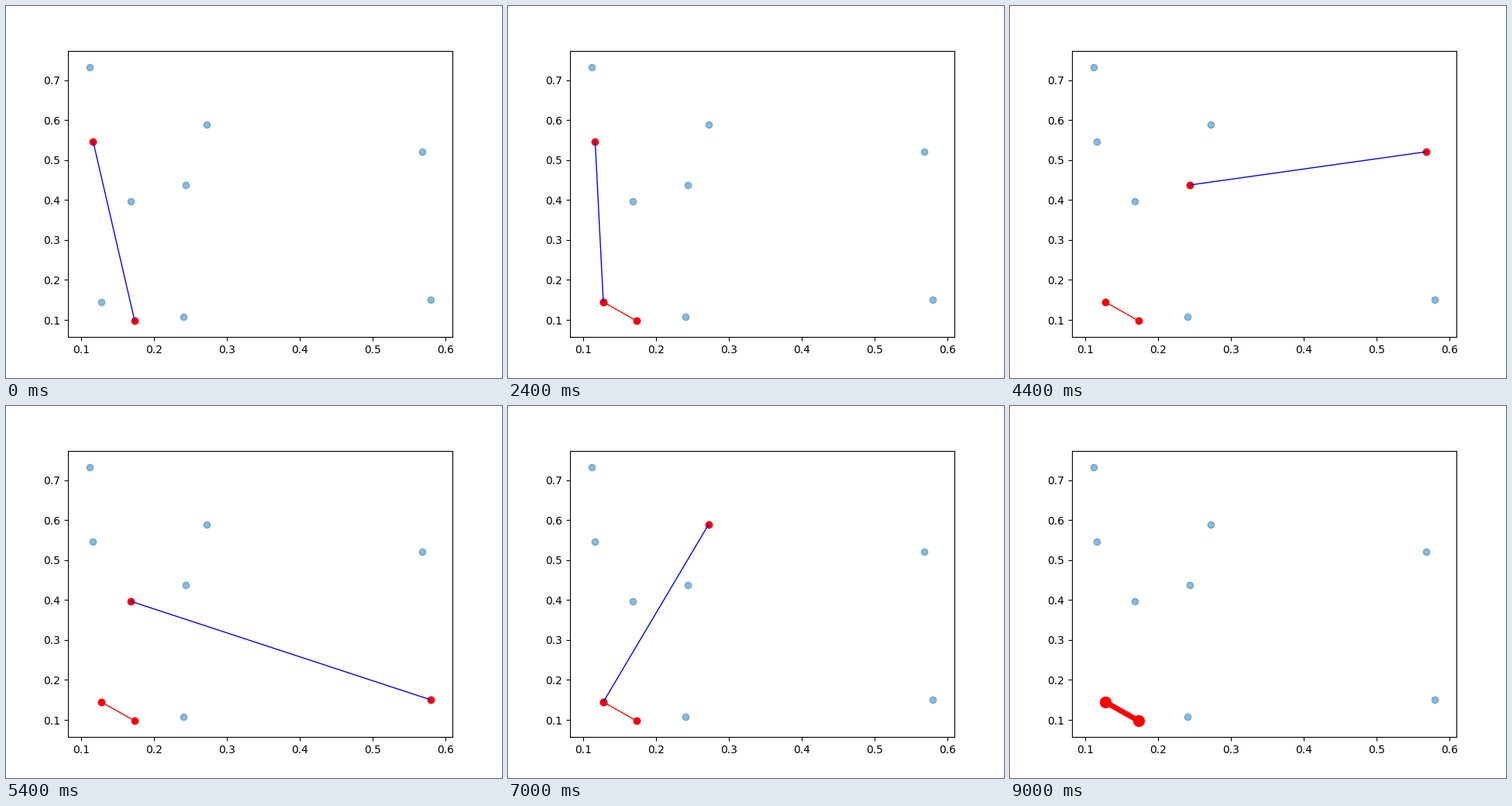
Write a matplotlib script that moves like this. It is 640 by 480 pixels and loops after 9.2 s.

```python
from itertools import combinations
from math import dist

import matplotlib.pyplot as plt
from matplotlib.animation import FuncAnimation

WIDTH, HEIGHT, DPI = 640, 480, 100
INTERVAL = 200
MARGIN = 0.05
DOT_PAD = 3  # room for a dot beyond the outermost points, in pixels

# The order of the points sets the order in which pairs are checked.
POINTS = [
    (0.1732, 0.0977), (0.1162, 0.5463), (0.2434, 0.4377), (0.1679, 0.3969),
    (0.2402, 0.1078), (0.1274, 0.1447), (0.2718, 0.5890), (0.5793, 0.1505),
    (0.5679, 0.5209), (0.1117, 0.7334),
]
PAIRS = list(combinations(POINTS, 2))


def padded_limits(values, pixels):
    """Limits that leave room for the dots plus a relative margin."""
    pad = DOT_PAD / pixels
    low, high = min(values) - pad, max(values) + pad
    margin = MARGIN * (high - low)
    return low - margin, high + margin


def show(line, pair):
    """Put a line on a pair of points, or empty it."""
    line.set_data(*zip(*pair)) if pair else line.set_data([], [])


fig, ax = plt.subplots(figsize=(WIDTH / DPI, HEIGHT / DPI), dpi=DPI)
xs, ys = zip(*POINTS)
box = ax.get_position()
ax.scatter(xs, ys, alpha=0.5)
ax.set_xlim(padded_limits(xs, box.width * WIDTH))
ax.set_ylim(padded_limits(ys, box.height * HEIGHT))

best_line, = ax.plot([], [], "ro-")
pair_dots, = ax.plot([], [], "ro")
pair_line, = ax.plot([], [], "b-", lw=1)
artists = [best_line, pair_dots, pair_line]


def update(step):
    """Show the pair being checked and the closest one among earlier pairs."""
    done = step == len(PAIRS)
    pair = None if done else PAIRS[step]
    best = min(PAIRS[:step], key=lambda p: dist(*p), default=None)

    show(best_line, best)
    show(pair_dots, pair)
    show(pair_line, pair)
    best_line.set_linewidth(5 if done else 1)
    best_line.set_markersize(10 if done else 6)
    return artists


def init():
    return update(0)


anim = FuncAnimation(fig, update, frames=len(PAIRS) + 1, init_func=init,
                     interval=INTERVAL, repeat=True, repeat_delay=0)
plt.show()
```
